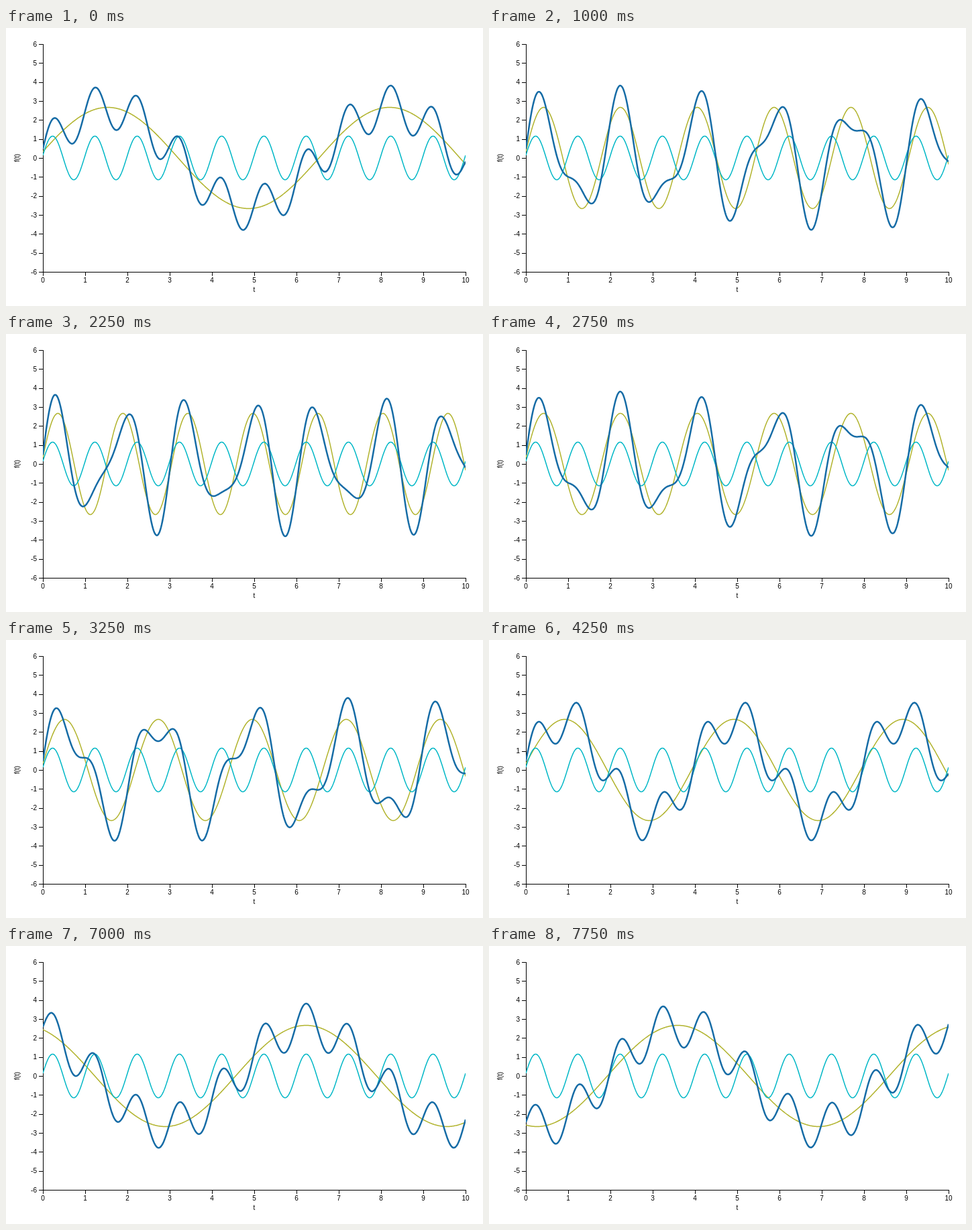
Animation of 711 by 415 pixels, one loop 8 s. Source, as an HTML page:

```html
<!DOCTYPE html>
<html lang="en">
<head>
<meta charset="utf-8">
<title>Sum of two sine waves</title>
<style>
  html, body { margin: 0; width: 100%; height: 100%; overflow: hidden; background: #fff; }
  svg { display: block; width: 711px; height: 415px; }
  text { font: 10px "Liberation Sans", Arial, sans-serif; fill: #000; }
  .axis { fill: none; stroke: #000; shape-rendering: crispEdges; }
  .wave { fill: none; stroke-width: 1.5; }
  #slow { stroke: #b1b32c; }
  #fast { stroke: #00b7c6; }
  #sum { stroke: #166ca6; stroke-width: 2.5; }
</style>
</head>
<body>
<svg viewBox="0 0 711 415">
  <defs><clipPath id="plot"><rect x="55" y="24" width="630" height="340"/></clipPath></defs>
  <g id="axes"></g>
  <text x="370" y="394" text-anchor="middle">t</text>
  <text transform="translate(20 194) rotate(-90)" text-anchor="middle">f(t)</text>
  <g clip-path="url(#plot)">
    <path id="slow" class="wave"/>
    <path id="fast" class="wave"/>
    <path id="sum" class="wave"/>
  </g>
</svg>
<script>
const LOOP = 8000, STEP = 250, TAU = 2 * Math.PI;
const PHASE = 0.02 * TAU;
const px = t => 55 + 63 * t;
const py = v => 194 - v * 340 / 12;
const $ = id => document.getElementById(id);

function drawAxes() {
  let lines = 'M55.5 24V365M55 364.5H686';
  let labels = '';
  for (let t = 0; t <= 10; t++) {
    lines += `M${px(t) + 0.5} 364V370`;
    labels += `<text x="${px(t)}" y="380.3" text-anchor="middle">${t}</text>`;
  }
  for (let v = -6; v <= 6; v++) {
    const y = Math.round(py(v));
    lines += `M49 ${y + 0.5}H55`;
    labels += `<text x="46" y="${py(v) + 3.5}" text-anchor="end">${v}</text>`;
  }
  $('axes').innerHTML = `<path class="axis" d="${lines}"/>${labels}`;
}

function curve(f) {
  let d = '';
  for (let i = 0; i <= 630; i++) {
    const t = i / 63;
    d += (i ? 'L' : 'M') + px(t).toFixed(2) + ' ' + py(f(t)).toFixed(2);
  }
  return d;
}

const sine = (amp, freq, phase) => t => amp * Math.sin(TAU * freq * t + phase);

// Frequency slider in steps of 0.05: quick rise, slow fall back to 3.
function freqAt(ms) {
  const n = Math.floor((ms - 500) / STEP);
  if (n < 0) return 0.15;
  const notch = n < 5 ? 5 + 3 * n : n < 7 ? 21 - n : 20 - n;
  return Math.max(3, notch) / 20;
}

// Phase slider in steps of 0.31 rad, three per tick up to 14.
function phaseAt(ms) {
  const n = Math.max(0, Math.floor((ms - 6500) / STEP));
  return PHASE + 0.31 * Math.min(14, 3 * n);
}

const fast = sine(1.15, 1, PHASE);
let shown = '';

function render(ms) {
  const freq = freqAt(ms), phase = phaseAt(ms);
  const key = freq + ' ' + phase;
  if (key === shown) return;
  shown = key;
  const slow = sine(2.665, freq, phase);
  $('slow').setAttribute('d', curve(slow));
  $('sum').setAttribute('d', curve(t => slow(t) + fast(t)));
}

drawAxes();
$('fast').setAttribute('d', curve(fast));
render(0);
const start = performance.now();
(function tick() {
  render((performance.now() - start) % LOOP);
  requestAnimationFrame(tick);
})();
</script>
</body>
</html>
```
